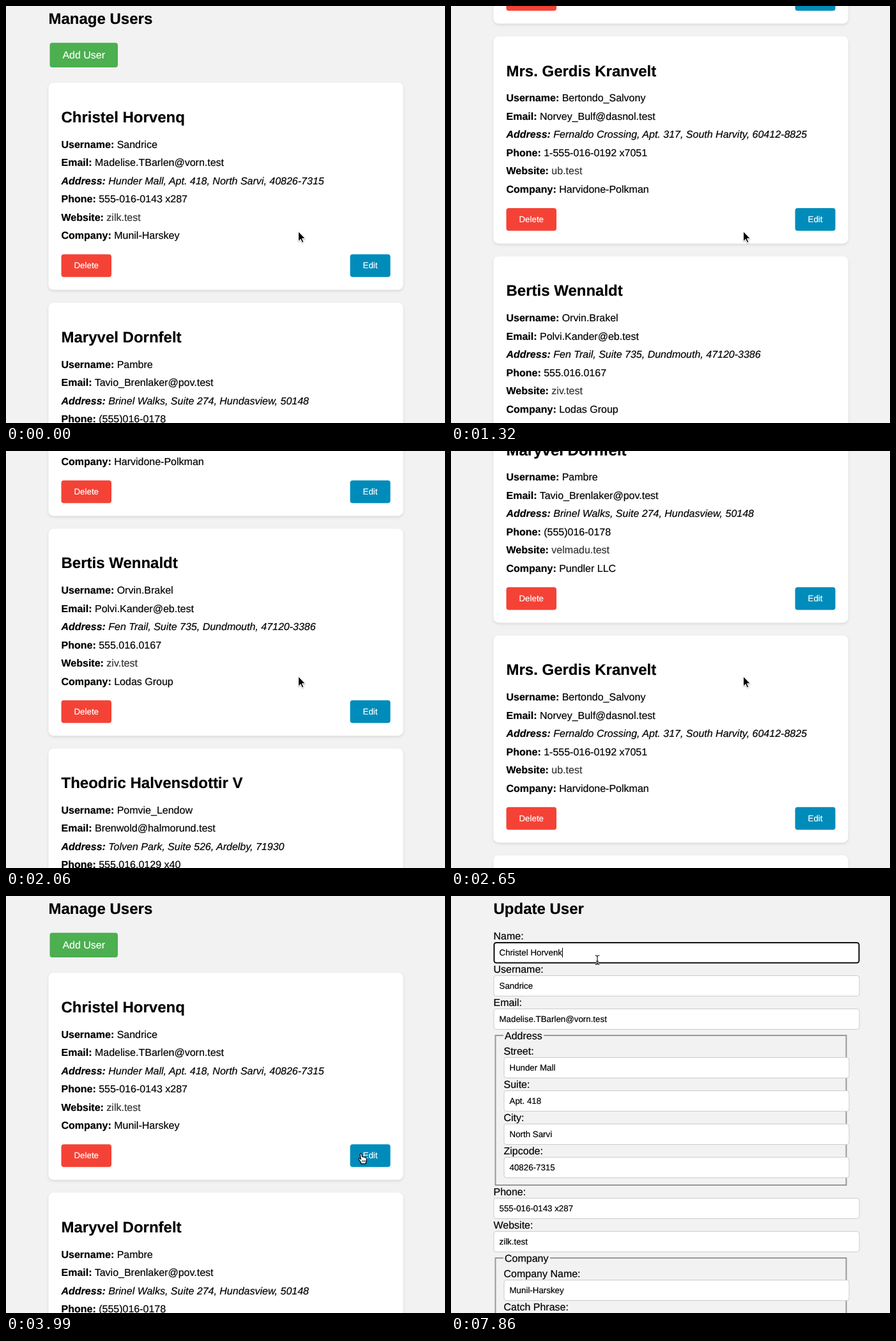
An HTML page for the animation above (8 s loop, 687 by 652 pixels).

```html
<!DOCTYPE html>
<html lang="en">
<head>
<meta charset="utf-8">
<title>Manage Users</title>
<style>
html, body { margin: 0; width: 100%; height: 100%; overflow: hidden; background: #f2f2f2; }
svg { display: block; width: 687px; height: 652px; }
text {
  font: 16px "Liberation Sans", Arial, sans-serif;
  text-rendering: geometricPrecision;
  color: #000; fill: currentColor; stroke: currentColor; stroke-width: .2;
}
.title { font-size: 24px; font-weight: bold; }
.bold { font-weight: bold; }
.italic { font-style: italic; }
.small { font-size: 13.333px; }
.button { color: #fff; text-anchor: middle; }
.link { color: #333; fill: currentColor; stroke: currentColor; }
.card { fill: #fff; filter: drop-shadow(0 2px 2px rgba(0, 0, 0, .1)); }
.input { fill: #fff; stroke: #ccc; }
.fieldset { fill: none; stroke: #999; stroke-width: 2; }
#arrow, #hand { filter: drop-shadow(0 1px 1px rgba(0, 0, 0, .3)); }
</style>
</head>
<body>
<svg viewBox="0 0 687 652">
  <rect width="687" height="652" fill="#f2f2f2"/>
  <g id="list"></g>
  <g id="form"></g>
  <g id="arrow">
    <path d="M0 0V15.4L3.5 12.1L5.9 17.4L8.3 16.3L5.9 11.2H10.8Z" fill="#000" stroke="#fff" stroke-linejoin="round"/>
  </g>
  <g id="hand">
    <path d="M4.2 16.5L3.6 14L.8 10.2Q0 8.7 1.3 8.2Q2.4 8 3.8 9.8L2.6 2.2Q2.4 .6 3.7 .5Q4.8 .5 5.1 2L5.9 6Q7.4 4.9 8.4 6.4Q9.8 5.6 10.6 7.1Q12.6 6.8 12.7 9L12.2 13L11.2 16.5Z" fill="#fff" stroke="#000" stroke-width="1.1" stroke-linejoin="round"/>
    <path d="M6.2 11V14M8.2 11V14M10.2 11V14" stroke="#000" stroke-width=".8"/>
  </g>
  <g id="beam" fill="none" stroke-linecap="round">
    <path d="M-3-7Q0-7 0-5Q0-7 3-7M0-5V5M-3 7Q0 7 0 5Q0 7 3 7M-1.5 2H1.5" stroke="#fff" stroke-width="2.6"/>
    <path d="M-3-7Q0-7 0-5Q0-7 3-7M0-5V5M-3 7Q0 7 0 5Q0 7 3 7M-1.5 2H1.5" stroke="#000" stroke-width="1.1"/>
  </g>
</svg>
<script>
const LOOP = 8000;
const CARD_PITCH = 343.8;
const labels = ["Username", "Email", "Address", "Phone", "Website", "Company"];
const users = [
  ["Christel Horvenq", "Sandrice", "Madelise.TBarlen@vorn.test", "Hunder Mall, Apt. 418, North Sarvi, 40826-7315", "555-016-0143 x287", "zilk.test", "Munil-Harskey"],
  ["Maryvel Dornfelt", "Pambre", "Tavio_Brenlaker@pov.test", "Brinel Walks, Suite 274, Hundasview, 50148", "(555)016-0178", "velmadu.test", "Pundler LLC"],
  ["Mrs. Gerdis Kranvelt", "Bertondo_Salvony", "Norvey_Bulf@dasnol.test", "Fernaldo Crossing, Apt. 317, South Harvity, 60412-8825", "1-555-016-0192 x7051", "ub.test", "Harvidone-Polkman"],
  ["Bertis Wennaldt", "Orvin.Brakel", "Polvi.Kander@eb.test", "Fen Trail, Suite 735, Dundmouth, 47120-3386", "555.016.0167", "ziv.test", "Lodas Group"],
  ["Theodric Halvensdottir V", "Pomvie_Lendow", "Brenwold@halmorund.test", "Tolven Park, Suite 526, Ardelby, 71930", "555.016.0129 x40", "dulv.test", "Fanric Group"]
];

const $ = id => document.getElementById(id);
const text = (x, y, content, cls = "", id = "") =>
  `<text x="${x}" y="${y}" class="${cls}" id="${id}">${content}</text>`;
const rect = (x, y, w, h, r, attrs) =>
  `<rect x="${x}" y="${y}" width="${w}" height="${h}" rx="${r}" ${attrs}/>`;
const button = (x, y, w, h, color, label, size = "") =>
  rect(x, y, w, h, 4, `fill="${color}"`) +
  text(x + w / 2, y + (size ? 22 : 24.5), label, "button " + size);

function card([name, ...values], i) {
  const lines = values.map((value, n) => {
    const body = labels[n] === "Website" ? `<tspan class="link">${value}</tspan>` : value;
    return text(86.5, 101.8 + n * 28.5, `<tspan class="bold">${labels[n]}:</tspan> ${body}`,
      labels[n] === "Address" ? "italic" : "");
  });
  return `<g transform="translate(0 ${120 + i * CARD_PITCH})">` +
    rect(66.5, 0, 555, 323.8, 8, 'class="card"') +
    text(86.5, 62, name, "title") + lines.join("") +
    button(86.5, 268.3, 78.5, 35.5, "#f44336", "Delete", "small") +
    button(538.5, 268.3, 63, 35.5, "#008cba", "Edit", "small") + "</g>";
}

function field(x, y, w, label, value, id) {
  return text(x, y, label + ":") + rect(x + .5, y + 4.5, w, 32, 3.5, 'class="input"') +
    text(x + 9, y + 25, value, "small", id);
}
const wide = (y, ...rest) => field(66.5, y, 572, ...rest);
const inner = (y, ...rest) => field(82.5, y, 540, ...rest);
const fieldset = (y, h, label, gapEnd) =>
  `<path class="fieldset" d="M82 ${y}H69.5V${y + h}H618.5V${y}H${gapEnd}"/>` + text(84, y + 6, label);

function build() {
  $("list").innerHTML = text(66.5, 28, "Manage Users", "title") +
    button(68.5, 57.5, 106.5, 38.5, "#4caf50", "Add User") + users.map(card).join("");

  const [name, username, email, address, phone, website, company] = users[0];
  const [street, suite, city, zip] = address.split(", ");
  $("form").innerHTML = text(66.5, 28, "Update User", "title") +
    wide(68, "Name", name, "name") + wide(120, "Username", username) + wide(172, "Email", email) +
    fieldset(218, 234, "Address", 145) +
    inner(248, "Street", street) + inner(300, "Suite", suite) +
    inner(352, "City", city) + inner(404, "Zipcode", zip) +
    wide(468, "Phone", phone) + wide(520, "Website", website) +
    fieldset(566, 300, "Company", 155) +
    inner(596, "Company Name", company) + inner(648, "Catch Phrase", "") +
    rect(67.5, 73, 571, 31.5, 3.5, 'id="focus" fill="none" stroke="#101010" stroke-width="2"') +
    rect(0, 81, 1, 15, 0, 'id="caret" fill="#000"');
}

// Scroll positions, one per screen refresh.
const TICK = 147;
const down = [40, 170, 320, 450, 565, 670, 760, 845, 920, 983, 1015, 1030];
const up = [930, 730, 519.2, 340, 195, 90, 25, 1, 0];
const sample = (list, elapsed) => list[Math.min(list.length - 1, Math.floor((elapsed + 5) / TICK))];

function scrollAt(t) {
  if (t < 440) return 0;
  return t < 2360 ? sample(down, t - 440) : sample(up, t - 2360);
}

// Each entry: start time, pointer shape, x, y.
const pointer = [
  [0, "arrow", 457.5, 352.5], [3550, "arrow", 472, 360], [3700, "arrow", 506, 378],
  [3845, "hand", 545, 397], [3990, "hand", 551.5, 402], [5030, "arrow", 390, 180],
  [5180, "arrow", 248, 32.5], [5480, "arrow", 242.5, 56], [5630, "beam", 236, 76],
  [5770, "beam", 233, 80], [7860, "beam", 229, 100]
];
const at = (keys, t) => keys.findLast(key => key[0] <= t);

const wrongName = users[0][0];
const stem = wrongName.slice(0, -1);
const names = [[0, wrongName], [7260, stem], [7560, stem + "k"]];

const show = (id, visible) => $(id).setAttribute("display", visible ? "inline" : "none");

function render(t) {
  const editing = t >= 4430;
  show("list", !editing);
  show("form", editing);
  $("list").setAttribute("transform", `translate(0 ${-scrollAt(t)})`);

  const [, shape, x, y] = at(pointer, t);
  for (const id of ["arrow", "hand", "beam"]) show(id, id === shape);
  $(shape).setAttribute("transform", `translate(${x} ${y})`);

  if (!editing) return;
  const name = $("name");
  name.textContent = at(names, t)[1];
  show("focus", t >= 5770);
  show("caret", (t >= 5920 && t < 6370) || t >= 6810);
  const caretX = t < 6810 ? 75.5 : 75.5 + name.getComputedTextLength();
  $("caret").setAttribute("x", Math.round(caretX));
}

build();
const start = performance.now();
function frame() {
  render((performance.now() - start) % LOOP);
  requestAnimationFrame(frame);
}
frame();
</script>
</body>
</html>
```
